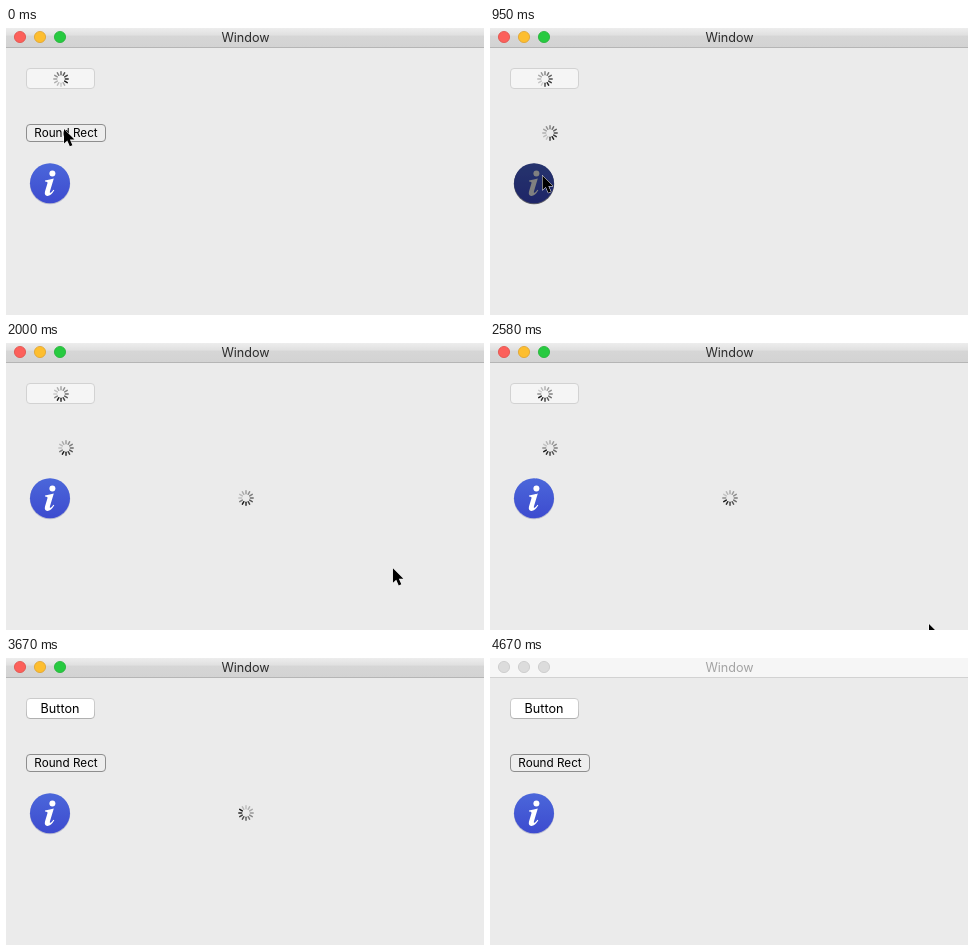
These frames come from a looping animation (478x287 px, 4770 ms). An HTML page:

```html
<!DOCTYPE html>
<html lang="en">
<head>
<meta charset="utf-8">
<title>Window</title>
<style>
  html, body { margin: 0; width: 100%; height: 100%; overflow: hidden; background: #ebebeb; }
  svg { display: block; width: 100%; height: 100%; }
  text { font-family: Inter, "Open Sans", sans-serif; font-size: 12.6px; text-anchor: middle; fill: #000; }
  .hidden { visibility: hidden; }

  #bar { fill: url(#barFill); }
  #rule { fill: #b5b5b5; }
  #title { fill: #2c2c2c; }
  .inactive #bar { fill: #f6f6f6; }
  .inactive #rule { fill: #d2d2d2; }
  .inactive #title { fill: #a3a3a3; }
  .inactive .light { fill: #dcdcdc; stroke: #c8c8c8; }

  #push rect { fill: #fff; stroke: url(#pushEdge); }
  #push.busy rect { fill: #f5f5f5; stroke: #d2d2d2; }
  #push.busy text { visibility: hidden; }

  #round rect { fill: #eee; stroke: #8e8e8e; }
  #round text { font-size: 11.7px; }
  #round.pressed rect { fill: #b8b8b8; }

  #info.pressed { filter: brightness(.5); }
  .spinner line { stroke: #000; stroke-width: 1.5; stroke-linecap: round; }
</style>
</head>
<body>
<svg id="stage" viewBox="0 0 478 287" preserveAspectRatio="none">
  <defs>
    <linearGradient id="barFill" x2="0" y2="1">
      <stop offset="0" stop-color="#ededed"/>
      <stop offset=".38" stop-color="#e0e0e0"/>
      <stop offset=".42" stop-color="#d6d6d6"/>
      <stop offset="1" stop-color="#d3d3d3"/>
    </linearGradient>
    <linearGradient id="pushEdge" x2="0" y2="1">
      <stop offset=".5" stop-color="#cbcbcb"/>
      <stop offset="1" stop-color="#b0b0b0"/>
    </linearGradient>
    <linearGradient id="infoFill" x2="0" y2="1">
      <stop offset="0" stop-color="#4b67da"/>
      <stop offset="1" stop-color="#3d4bcf"/>
    </linearGradient>
  </defs>

  <rect width="478" height="287" fill="#ebebeb"/>
  <rect id="bar" width="478" height="19"/>
  <rect id="rule" y="19" width="478" height="1"/>
  <circle class="light" cx="14" cy="9" r="5.6" fill="#fc605b" stroke="#e0504a" stroke-width=".8"/>
  <circle class="light" cx="34" cy="9" r="5.6" fill="#fdbe2f" stroke="#dfa32f" stroke-width=".8"/>
  <circle class="light" cx="54" cy="9" r="5.6" fill="#27ca40" stroke="#24b138" stroke-width=".8"/>
  <text id="title" x="239.5" y="14">Window</text>

  <g id="push">
    <rect x="20.5" y="40.5" width="68" height="20" rx="3.5"/>
    <text x="54" y="55">Button</text>
  </g>
  <g id="round">
    <rect x="20.5" y="96.5" width="79" height="17" rx="3.5"/>
    <text x="60" y="109">Round Rect</text>
  </g>
  <g id="info">
    <circle cx="44" cy="156" r="20.2" fill="#b9bbd0"/>
    <circle cx="44" cy="155.2" r="20" fill="url(#infoFill)"/>
    <circle cx="46.4" cy="145.6" r="3" fill="#fff"/>
    <path fill="#fff" d="M39 152.6 Q44 151.8 47.8 150.6 L43.9 163.6 Q43.4 165.6 45 164.4 Q46.4 163.2 47.4 161.7 L48.3 162.3 Q45 168 41.3 167.9 Q38 167.6 39 163.6 L41.4 155.4 Q42 153.5 39 153.6 Z"/>
  </g>

  <g id="pushSpinner" class="spinner" transform="translate(55 51)"></g>
  <g id="roundSpinner" class="spinner" transform="translate(60 105)"></g>
  <g id="infoSpinner" class="spinner" transform="translate(240 155)"></g>

  <path id="cursor" d="M0 0 V14.6 L3.3 11.5 L5.8 17.3 L8.4 16.2 L5.9 10.5 H10.5 Z" fill="#000" stroke="#fff" stroke-width="1" paint-order="stroke"/>
</svg>
<script>
  const LOOP = 4770;
  const SPOKES = 12;
  // Moments at which the screen refreshes.
  const ticks = [0, 140, 320, 500, 650, 800, 950, 1100, 1250, 1400, 1550, 1700, 1850, 2000, 2140,
    2290, 2430, 2580, 2760, 2910, 3060, 3220, 3380, 3520, 3670, 3820, 3970, 4120, 4270, 4670];
  // Pointer waypoints: time, x, y.
  const path = [[0, 58, 101], [320, 58, 103], [500, 55, 132], [800, 52, 147], [1100, 53, 148],
    [1250, 120, 156], [1400, 235, 178], [1550, 307, 194], [1850, 375, 218], [2290, 410, 239],
    [2580, 439, 281], [2760, 445, 300]];

  const el = id => document.getElementById(id);
  const within = (t, from, to) => t >= from && t < to;
  const show = (id, on) => el(id).classList.toggle("hidden", !on);

  const spinners = [...document.querySelectorAll(".spinner")];
  for (const spinner of spinners) {
    for (let i = 0; i < SPOKES; i++) {
      const line = document.createElementNS("http://www.w3.org/2000/svg", "line");
      line.setAttribute("y1", -4.3);
      line.setAttribute("y2", -7.2);
      line.setAttribute("transform", `rotate(${i * 360 / SPOKES})`);
      spinner.append(line);
    }
  }

  function spin(t) {
    const head = 4.2 + t * 0.0016;
    for (const spinner of spinners) {
      [...spinner.children].forEach((line, i) => {
        const lag = ((head - i) % SPOKES + SPOKES) % SPOKES;
        const glow = lag > 11 ? lag - 11 : (1 - lag / 11) ** 1.3;
        line.setAttribute("opacity", 0.15 + 0.77 * glow);
      });
    }
  }

  function pointerAt(t) {
    const next = path.findIndex(p => p[0] > t);
    if (next < 0) return path[path.length - 1].slice(1);
    const [a, b] = [path[next - 1], path[next]];
    const u = (t - a[0]) / (b[0] - a[0]);
    return [1, 2].map(k => a[k] + (b[k] - a[k]) * u);
  }

  function render(t) {
    const pushBusy = t < 2910;
    const roundBusy = within(t, 320, 3520);
    el("push").classList.toggle("busy", pushBusy);
    show("pushSpinner", pushBusy);
    show("round", !roundBusy);
    show("roundSpinner", roundBusy);
    show("infoSpinner", within(t, 1100, 4270));
    el("round").classList.toggle("pressed", within(t, 140, 320));
    el("info").classList.toggle("pressed", within(t, 950, 1100));
    el("stage").classList.toggle("inactive", t >= 4670);
    show("cursor", t < 2760);
    el("cursor").setAttribute("transform", `translate(${pointerAt(t).join(" ")})`);
    spin(t);
  }

  const start = performance.now();
  function frame() {
    const t = (performance.now() - start) % LOOP;
    render(ticks.findLast(tick => tick <= t));
    requestAnimationFrame(frame);
  }
  frame();
</script>
</body>
</html>
```
